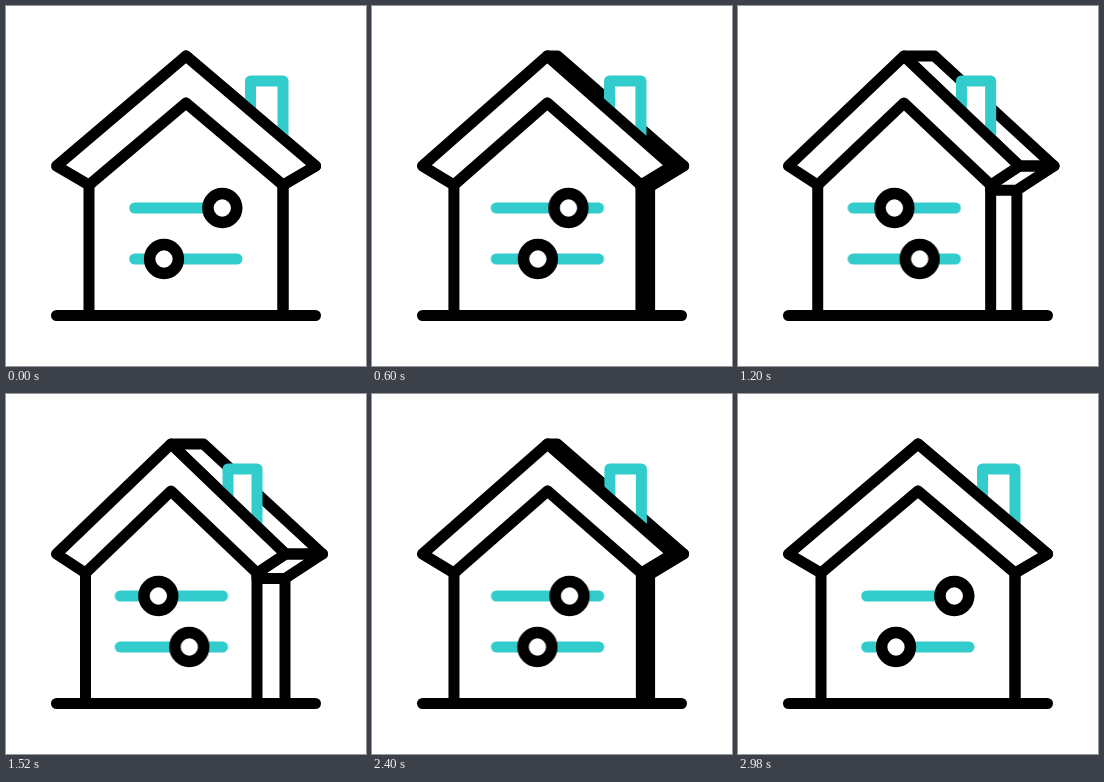
These frames come from a looping animation (360 by 360 pixels, 3 s). An HTML page without scripts:

```html
<!DOCTYPE html>
<html lang="en">
<head>
<meta charset="utf-8">
<title>Smart home</title>
<style>
  html, body { margin: 0; width: 100%; height: 100%; overflow: hidden; background: #fff; }
  svg { display: block; width: 100vw; height: 100vh; }

  path, circle {
    fill: none;
    stroke: #000;
    stroke-width: 11;
    stroke-linecap: round;
    stroke-linejoin: round;
  }
  .teal { stroke: #33cccc; }
  .solid { fill: #fff; }
  .chimney { stroke-linecap: butt; }
  .knob { stroke-width: 11.5; }

  /* each part turns between pose --a and pose --b */
  .turn { d: var(--a); animation: turn 3s infinite; }
  .slide { animation: slide 3s infinite; }
  .turn, .slide { animation-timing-function: cubic-bezier(.5, 0, .5, 1); }

  @keyframes turn {
    0%, 99.33%, 100% { d: var(--a); }
    50% { d: var(--b); }
  }
  @keyframes slide {
    0%, 99.33%, 100% { transform: translateX(0); }
    50% { transform: translateX(var(--dx)); }
  }

  .roof-side {
    --a: path("M180 50 L180 50 L309.5 160 L309.5 160 Z");
    --b: path("M165 50 L197.5 50 L316.5 160 L279.5 160 Z");
  }
  .eave {
    --a: path("M277 179 L309.5 160 L309.5 160 L277 179 L277 179 Z");
    --b: path("M251 179 L279.5 160 L316.5 160 L279 184.5 L251 184.5 Z");
  }
  .wall-side {
    --a: path("M277 179 L277 309.5");
    --b: path("M279 184.5 L279 309.5");
  }
  .chimney {
    --a: path("M244.5 105 L244.5 75 L277 75 L277 132");
    --b: path("M222 105 L222 75 L251 75 L251 132");
  }
  .roof-front {
    --a: path("M180 50 L309.5 160 L277 179 L180 97 L83 179 L50.5 160 Z");
    --b: path("M165 50 L279.5 160 L251 179 L165 97 L79.5 179 L50.5 160 Z");
  }
  .wall-front {
    --a: path("M83 179 L83 309.5 M277 179 L277 309.5");
    --b: path("M79.5 179 L79.5 309.5 M251 179 L251 309.5");
  }
  .tracks { --dx: -14.5px; }
  .top { --dx: -64px; }
  .low { --dx: 25.3px; }
</style>
</head>
<body>
<svg viewBox="0 0 360 360">
  <path class="turn roof-side"/>
  <path class="turn eave"/>
  <path class="turn wall-side"/>
  <path class="turn chimney teal solid"/>
  <path class="turn roof-front solid"/>
  <path class="turn wall-front"/>
  <path d="M50.5 309.5H309.5"/>
  <path class="slide tracks teal" d="M128.7 202H231M128.7 253H231"/>
  <circle class="slide knob top solid" cx="216.3" cy="202" r="14.4"/>
  <circle class="slide knob low solid" cx="158" cy="253" r="14.4"/>
</svg>
</body>
</html>
```
